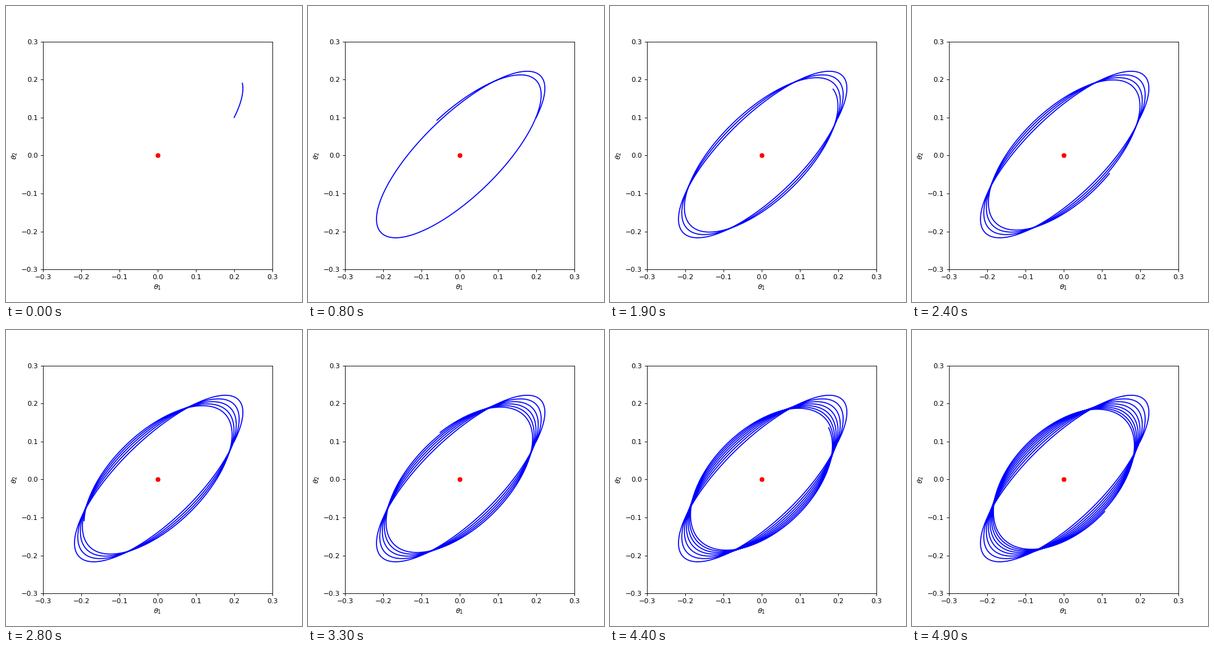
Animation of 480 by 480 pixels, one loop 5 s. Source, as a matplotlib script:

```python
import numpy as np
import matplotlib.pyplot as plt
from matplotlib.animation import FuncAnimation

FRAMES = 50
STEPS_PER_FRAME = 50
FIRST_STEPS = 28
DT = 1 / STEPS_PER_FRAME


def derivative(state):
    """Unit-frequency oscillator whose damping acts only along the radius."""
    pos, vel = state
    return np.array([vel, -pos * (1 + pos @ vel)])


def rk4_step(state):
    k1 = derivative(state)
    k2 = derivative(state + DT / 2 * k1)
    k3 = derivative(state + DT / 2 * k2)
    k4 = derivative(state + DT * k3)
    return state + DT / 6 * (k1 + 2 * k2 + 2 * k3 + k4)


def trajectory(pos, vel, steps):
    state = np.array([pos, vel])
    points = [state[0]]
    for _ in range(steps):
        state = rk4_step(state)
        points.append(state[0])
    return np.array(points)


path = trajectory((0.2, 0.1), (0.1, 0.2), FRAMES * STEPS_PER_FRAME)

fig, ax = plt.subplots(figsize=(6, 6), dpi=80)
ax.set_xlim(-0.3, 0.3)
ax.set_ylim(-0.3, 0.3)
ax.set_xlabel(r"$\theta_1$")
ax.set_ylabel(r"$\theta_2$")
curve, = ax.plot([], [], "b-")
ax.plot(0, 0, "ro")


def update(frame):
    end = FIRST_STEPS + frame * STEPS_PER_FRAME + 1
    curve.set_data(path[:end, 0], path[:end, 1])
    return curve,


anim = FuncAnimation(fig, update, frames=FRAMES, interval=100,
                     repeat=True, repeat_delay=0)
plt.show()
```
